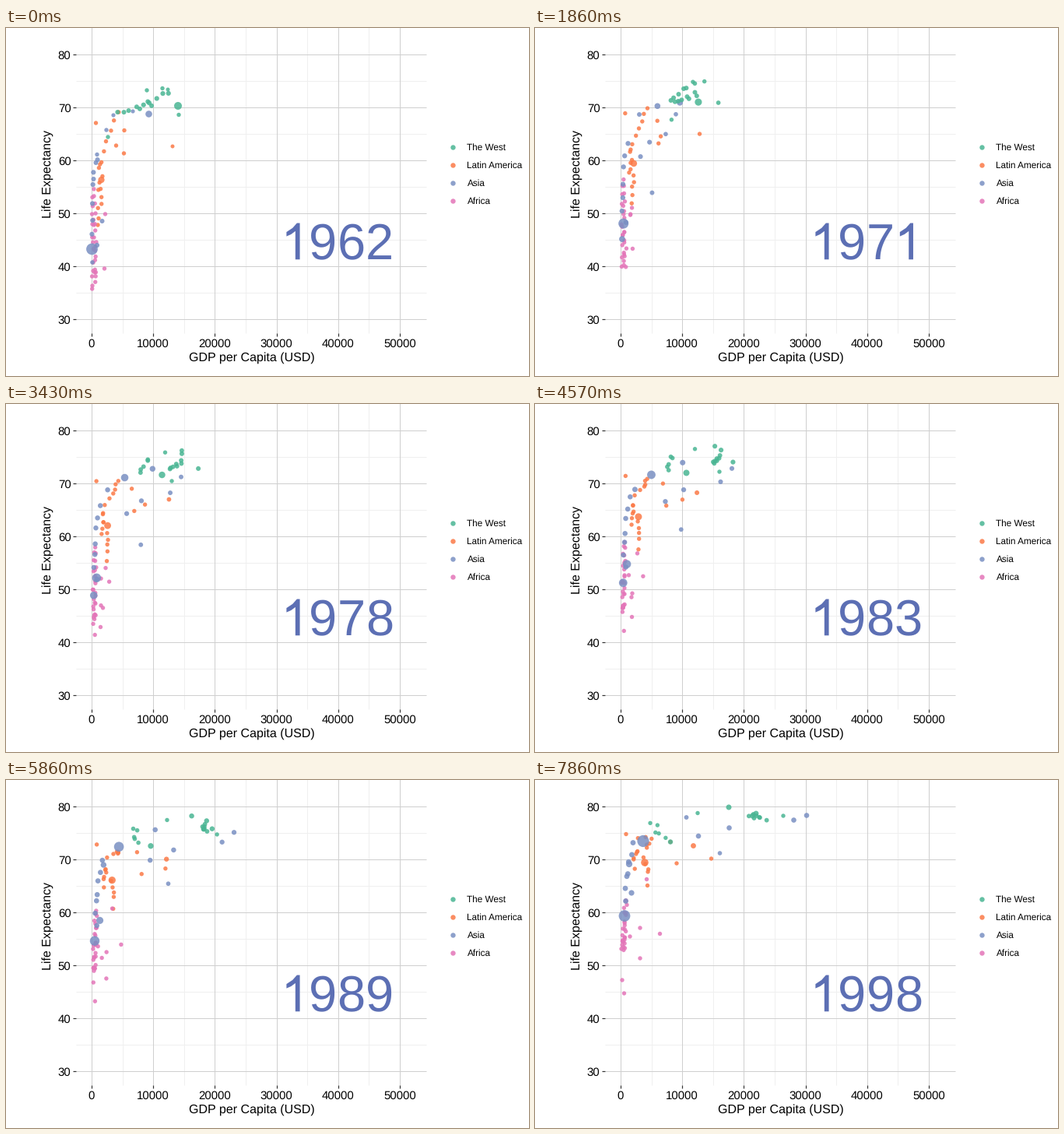
These frames come from a looping animation (672 px wide and 447 px high, 8 s). A matplotlib script:

```python
import numpy as np
import matplotlib.pyplot as plt
from matplotlib.animation import FuncAnimation
from matplotlib.patches import Polygon

W, H, DPI = 672, 447, 96
FRAMES, LOOP = 56, 8000
PT = 72 / DPI
GREEN, ORANGE, BLUE, PINK = "#49B593", "#FB7946", "#798FC2", "#E375B8"
ALPHA = 0.85

plt.rcParams["font.family"] = "Liberation Sans"
plt.rcParams["text.hinting"] = "none"

rng = np.random.default_rng(4)
tracks, colors = [], []


def stream(color, n, first, last, spread0, spread1, r=(2.7, 2.7)):
    """n straight tracks (x0, y0, x1, y1) blended from first to last, scattered."""
    u = np.linspace(0, 1, n)[:, None]
    path = np.array(first) * (1 - u) + np.array(last) * u
    path += rng.uniform(-1, 1, (n, 4)) * (*spread0, *spread1)
    tracks.append(np.hstack([path, np.tile(r, (n, 1))]))
    colors.extend([color] * n)


def dot(color, *track, r=(2.7, 2.7)):
    stream(color, 1, track, track, (0, 0), (0, 0), r)


# Latin America
stream(ORANGE, 5, (143, 108, 138, 92), (124, 155, 146, 72), (2, 4), (6, 6))
stream(ORANGE, 11, (121, 168, 129, 82), (119, 240, 137, 120), (4, 5), (10, 10))
stream(ORANGE, 2, (152, 131.5, 174, 79.5), (151.5, 161, 182, 107), (0, 0), (0, 0))
dot(ORANGE, 115.5, 122, 117, 69.5)
dot(ORANGE, 214, 152, 203.5, 84.5, r=(2.5, 3.4))
dot(ORANGE, 141.5, 151, 226.5, 101)
dot(ORANGE, 118, 253, 144.5, 135.5)
dot(ORANGE, 122.5, 195, 141, 106, r=(4.1, 4.8))

# Africa
stream(PINK, 25, (113, 210, 116, 155), (113, 333, 112.5, 225), (2.5, 4), (2.5, 14))
stream(PINK, 2, (111, 331, 135, 229), (112, 312, 135, 190), (0, 0), (0, 0))
stream(PINK, 2, (113, 269, 112, 257), (114, 314, 114.5, 274), (0, 0), (0, 0))
dot(PINK, 126.5, 309, 122, 201)
dot(PINK, 127.5, 239, 115, 205)
dot(PINK, 111, 252, 160.5, 197.5)
dot(PINK, 116, 275, 143.5, 127.5)

# Asia
stream(BLUE, 7, (114, 166, 124, 78), (113, 280, 116, 155), (4, 6), (2, 6), (3.1, 3.4))
stream(BLUE, 2, (129, 131, 349, 45.5), (117, 162.5, 332.5, 51.5), (0, 0), (0, 0),
       (2.7, 3.3))
stream(BLUE, 2, (115.5, 173, 249.5, 61.5), (112.5, 194, 210, 72), (0, 0), (0, 0),
       (3, 3.3))
dot(BLUE, 123.5, 248, 237.5, 94, r=(3, 2.8))
dot(BLUE, 138, 112, 121, 108, r=(2.6, 4.1))
dot(BLUE, 183.5, 110.5, 194.5, 48, r=(4.3, 2.9))
dot(BLUE, 163, 107, 139, 78.5, r=(2.6, 7.6))
dot(BLUE, 110.5, 284, 124, 145, r=(7.4, 3.6))
dot(BLUE, 111, 301, 115, 174.5, r=(2.8, 7.4))

# The West
stream(GREEN, 7, (143, 106, 294, 52), (187, 97, 276, 45), (3, 4), (4, 3), (3, 2.9))
stream(GREEN, 5, (178, 98, 166, 74), (206, 83, 150, 58), (3, 4), (4, 4), (3.1, 2.7))
stream(GREEN, 2, (181, 80, 284, 43), (222, 111.5, 279.5, 46), (0, 0), (0, 0),
       (2.7, 3.4))
dot(GREEN, 221, 100, 174, 79.5, r=(5, 3.2))
dot(GREEN, 208, 79, 249, 35, r=(2.5, 3.5))
dot(GREEN, 201, 77.5, 209, 42.5)
dot(GREEN, 131, 140, 319, 46)

dots = np.vstack(tracks)
start, end, r0, r1 = dots[:, :2], dots[:, 2:4], dots[:, 4], dots[:, 5]


def area(radius):
    return (2 * radius * PT) ** 2


def px(gdp):
    return 110 + gdp * 0.00792


def py(years):
    return 34 + (80 - years) * 6.8


fig = plt.figure(figsize=(W / DPI, H / DPI), dpi=DPI, facecolor="white")
ax = fig.add_axes([0, 0, 1, 1])
ax.set_xlim(0, W)
ax.set_ylim(H, 0)
ax.axis("off")


def line(xs, ys, color, width, z):
    ax.plot(xs, ys, color=color, lw=width * PT, zorder=z,
            solid_capstyle="butt")


def label(x, y, text, size, **kw):
    return ax.text(x, y, text, fontsize=size * PT,
                   **{"va": "baseline", "color": "black", **kw})


LEFT, RIGHT, BOTTOM = 90, 540, 391.5
for gdp in range(5000, 50000, 10000):
    line([px(gdp)] * 2, [-1, BOTTOM], "#EFEFEF", 1, 0)
for age in range(35, 80, 10):
    line([LEFT, RIGHT], [py(age)] * 2, "#EFEFEF", 1, 0)
for gdp in range(0, 50001, 10000):
    line([px(gdp)] * 2, [-1, BOTTOM], "#CFCFCF", 1, 1)
    line([px(gdp)] * 2, [392, 396], "#333333", 1.2, 1)
    label(px(gdp), 410, str(gdp), 15, ha="center")
for age in range(30, 81, 10):
    line([LEFT, RIGHT], [py(age)] * 2, "#CFCFCF", 1, 1)
    line([86, 90], [py(age)] * 2, "#333333", 1.2, 1)
    label(83.5, py(age) + 5.5, str(age), 15, ha="right")

label(315.5, 428, "GDP per Capita (USD)", 16, ha="center")
label(61, 187.5, "Life Expectancy", 16, rotation=90, ha="right", va="center")

legend = [("The West", GREEN), ("Latin America", ORANGE),
          ("Asia", BLUE), ("Africa", PINK)]
for i, (name, color) in enumerate(legend):
    y = 153 + 23 * i
    ax.scatter([574], [y], s=area(3.2), c=color, alpha=ALPHA, linewidths=0)
    label(592.5, y + 4, name, 11.7)

cloud = ax.scatter(*start.T, s=area(r0), c=colors, alpha=ALPHA,
                   linewidths=0, zorder=3)

# The year: four digit slots, with a "1" that has no foot.
SIZE, YEAR_X, YEAR_Y, INK = 65, 353.3, 297.3, "#5C6FB4"
ONE = np.array([(.373, 0), (.285, 0), (.285, .56), (.2, .497), (.109, .457),
                (.109, .542), (.23, .622), (.316, .719), (.373, .719)])
digits, ones = [], []
for i in range(4):
    x = YEAR_X + i * 0.556 * SIZE
    digits.append(label(x, YEAR_Y, "", SIZE, color=INK, zorder=4))
    shape = ONE * (SIZE, -SIZE) + (x, YEAR_Y)
    ones.append(ax.add_patch(Polygon(shape, color=INK, lw=0, zorder=4)))


def update(frame):
    t = frame / (FRAMES - 1)
    cloud.set_offsets(start + (end - start) * t)
    cloud.set_sizes(area(r0 + (r1 - r0) * t))
    year = str(round(1962 + frame * 49 / 74))
    for char, digit, one in zip(year, digits, ones):
        one.set_visible(char == "1")
        digit.set_text("" if char == "1" else char)
    return cloud, *digits, *ones


anim = FuncAnimation(fig, update, frames=FRAMES, interval=LOOP / FRAMES,
                     repeat=True, repeat_delay=0)
plt.show()
```
